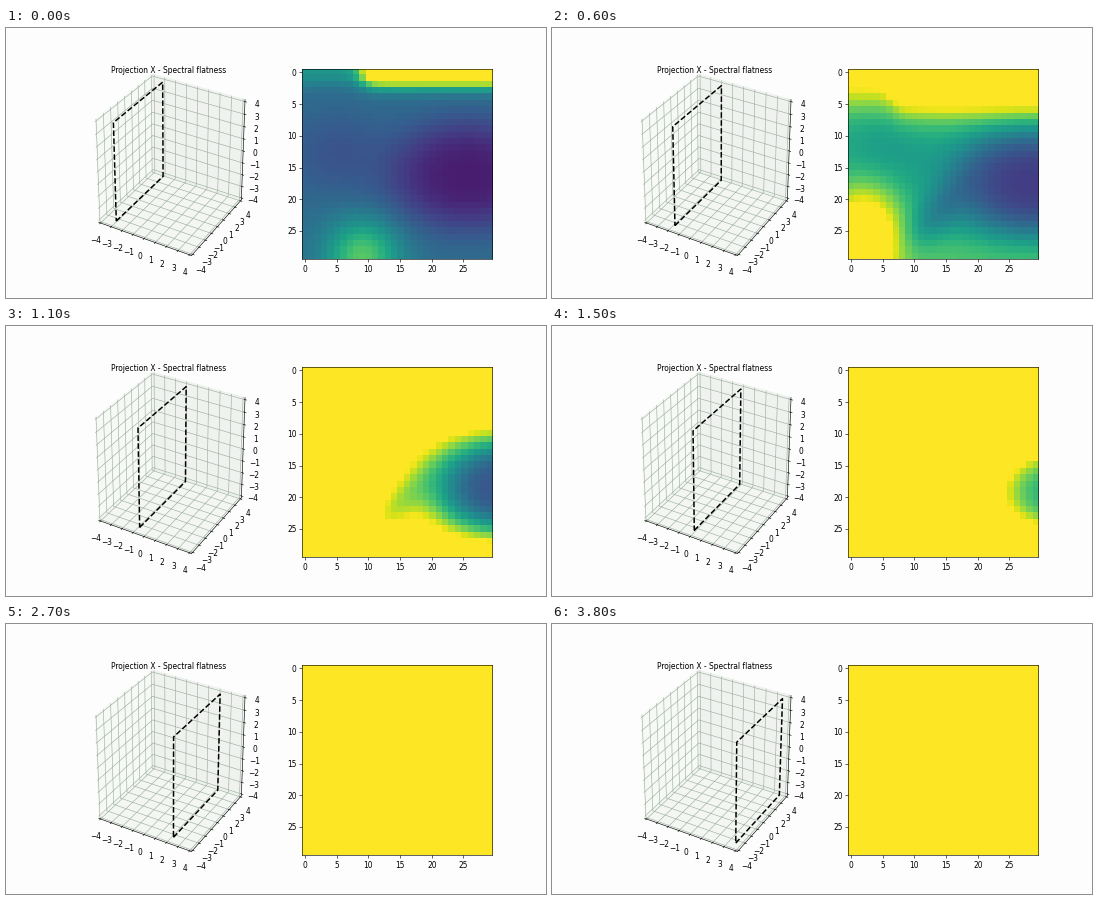
These frames come from a looping animation (540x270 px, 3.9 s). A matplotlib script:

```python
import numpy as np
import matplotlib.pyplot as plt
from matplotlib.animation import FuncAnimation

TICKS = 39
HELD = (20, 24, 32)  # ticks that repeat the one before
Y0, Y1, Z = -3.55, 3.7, 4

plt.rcParams["font.family"] = "DejaVu Sans"
plt.rcParams["grid.color"] = "#9cae9c"

row, col = np.mgrid[0:30, 0:30]


def bell(r, c, size_r, size_c, power=1):
    """Rounded hill of height 1; a higher power flattens its top."""
    d2 = ((row - r) / size_r) ** 2 + ((col - c) / size_c) ** 2
    return np.exp(-d2 ** power)


def field(t):
    """Flatness over the cutting plane, saturating at 1."""
    v = 0.36 + 0.0075 * t ** 2 - 0.1 * bell(13, 5, 7, 8)

    # diagonal valley that trails behind the basin
    slant = (row - 22 + 0.8 * (col - 14)) / 4.2
    v -= 0.03 * t * np.exp(-slant ** 2 - ((col - 14) / 6.4) ** 2)

    # dark basin drifting to the right, filling up late
    core = 0.08 + 0.017 * t + 0.6 * max(t - 11, 0) / 8
    basin = bell(16.3 + 0.2 * t, 25.5 + 0.5 * t, 9, 13, 1.5)
    v += (core - v) * basin

    # bright band growing down from the top, weaker on the left
    depth = min(2.3 + 0.56 * t, 5.7)
    weak = min(0.15 + 0.008 * t ** 2, 1)
    side = 1 / (1 + np.exp((9.3 - 0.4 * t - col) / 0.8))
    v += 1.1 * np.exp(-(row / depth) ** 2) * (weak + (1 - weak) * side)

    # bright hill in the lower left and a rim along the bottom
    v += (0.38 + 0.045 * t) * bell(29 - 0.5 * t, max(9 - 1.2 * t, 2),
                                   5.5 + 0.4 * t, 5.7)
    v += 0.015 * t * np.exp(-((29 - row) / 4) ** 2)
    return np.clip(v, 0, 1)


def plane(t):
    x = np.interp(t, [0, 19, 31, 38], [-2.92, 0.79, 2.98, 3.67])
    return [x] * 5, [Y0, Y1, Y1, Y0, Y0], [-Z, -Z, Z, Z, -Z]


fig = plt.figure(figsize=(10, 5), dpi=54, facecolor="#fefdfe")

ax = fig.add_subplot(121, projection="3d", facecolor="#fefdfe")
ax.apply_aspect = lambda position=None: None  # fill the whole subplot
ax.set_box_aspect((1, 1, 1), zoom=np.sqrt(3) / 1.8294640721620434)
ax.view_init(elev=30, azim=-60)
edge = 4 * 25 / 24
ax.set(xlim=(-edge, edge), ylim=(-edge, edge), zlim=(-edge, edge))
for axis, shade in ((ax.xaxis, .95), (ax.yaxis, .90), (ax.zaxis, .925)):
    axis.set_ticks(range(-4, 5))
    axis.set_pane_color((shade - .01, shade + .015, shade - .01, .5))
ax.set_title("Projection X - Spectral flatness", fontsize=10, y=1)
outline, = ax.plot(*plane(0), "k--", lw=2)

ax2 = fig.add_subplot(122)
image = ax2.imshow(field(0), cmap="viridis", vmin=0, vmax=1,
                   interpolation="nearest")
ax2.set_xticks(range(0, 30, 5))
ax2.set_yticks(range(0, 30, 5))


def update(n):
    t = n - 1 if n in HELD else n
    outline.set_data_3d(*plane(t))
    image.set_data(field(min(t, 19)))
    return outline, image


anim = FuncAnimation(fig, update, frames=TICKS, interval=100,
                     repeat=True, repeat_delay=0, blit=False)
plt.show()
```
